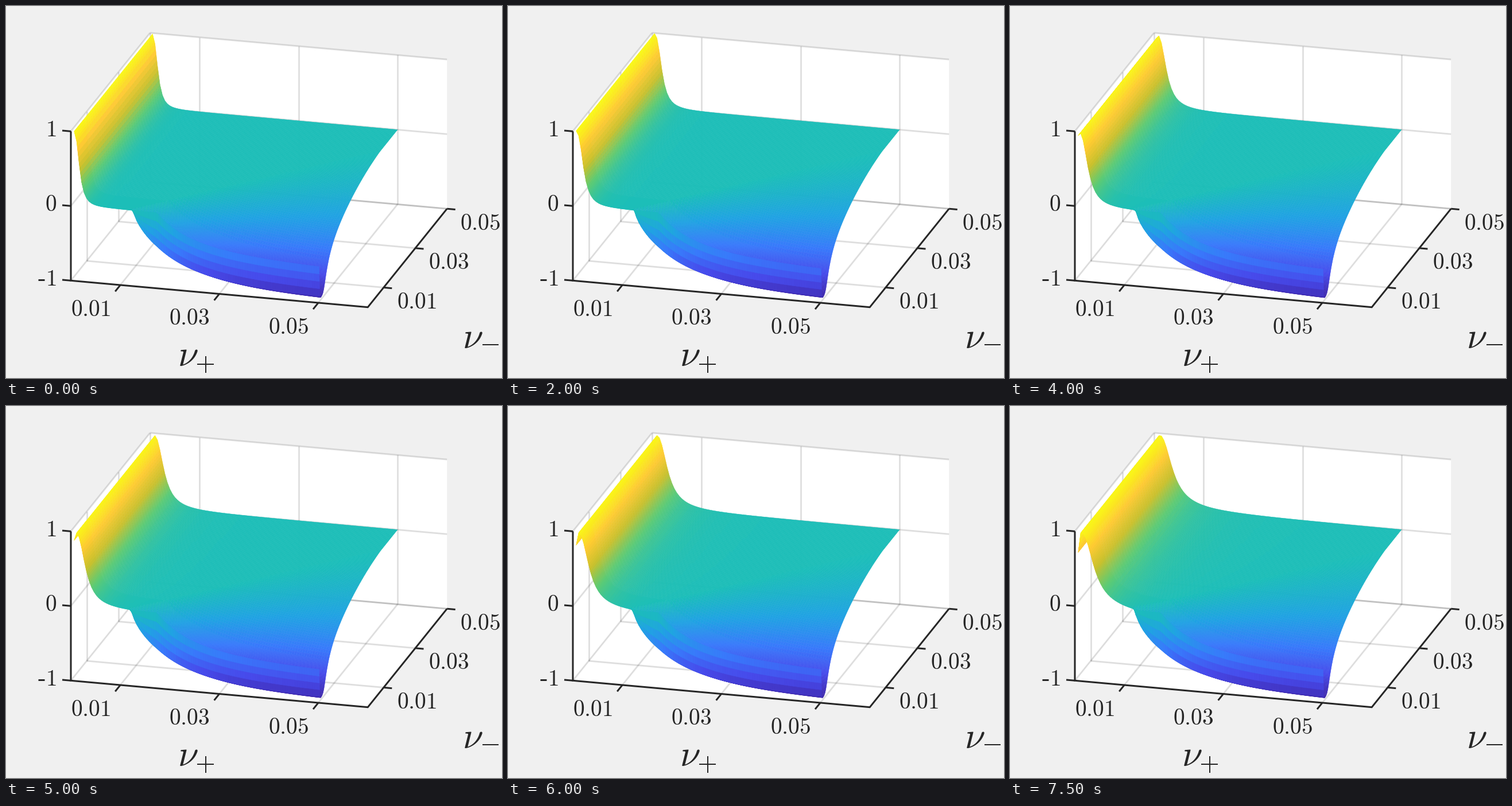
Recreate the animation shown at these times as a matplotlib script. Size 864 by 648 pixels, loop 8 s.

```python
import numpy as np
import matplotlib.pyplot as plt
from matplotlib.animation import FuncAnimation
from matplotlib.collections import PolyCollection
from matplotlib.colors import LinearSegmentedColormap

W, H = 864, 648
FRAMES, STEP = 16, 500
INK = "#262626"
X1, Y1 = .06, .05
TICKS = (.01, .03, .05)
ZT = (-1, 0, 1)
plt.rcParams["mathtext.fontset"] = "cm"

# evenly spaced key colours from indigo through teal to yellow
KEYS = ("#3e26a8 #474aeb #387afb #20a3e3 #1bbeb9 "
        "#5dcb75 #cac12d #feca33 #f9fb15").split()
cmap = LinearSegmentedColormap.from_list("surface", KEYS, N=256)


def project(x, y, z):
    """Orthographic view of the box, in stage pixels."""
    return (113 + 8620 * x + 2760 * y,
            348.3 + 773 * x - 3430 * y - 130 * z)


def height(x, y, t):
    """Surface value at rates x, y after t seconds."""
    # upper lobe along small x: widens, and its rim sinks after 3 s
    a = .00145 * np.exp(.097 * t)
    up = (1 + (x / a) ** 4) ** (-.75 + .033 * t)
    up = up * np.clip(1 - (x / (.0124 + .9 * y)) ** 3, 0, 1)
    up = up - .065 * max(t - 3, 0) * np.exp(-(x - .0005) / .0002)

    # lower lobe, starting at a slanted threshold
    c = .01125 - .00008 * t + y
    r = np.clip(x / c - 1, 0, None)
    down = np.tanh(1.04 * r ** (.65 + 10 * y))
    down = down * (1 + (y / .0036) ** 8) ** -.09

    # the lobe weakens at the front rim
    amp = .585 + .045 * (1 - np.exp(-t / 2.2))
    rim = amp * np.clip(1 - (.0172 / x) ** 2.2, 0, None)
    w = np.exp(-(y - .0005) / .0002)
    return up - (1 - w) * down - w * rim


fig = plt.figure(figsize=(W / 72, H / 72), dpi=72, facecolor="#f0f0f0")
ax = fig.add_axes([0, 0, 1, 1])
ax.set_xlim(0, W)
ax.set_ylim(H, 0)
ax.axis("off")


def line(p, q, color=INK, lw=3, zorder=5, **kw):
    ax.plot([p[0], q[0]], [p[1], q[1]], color=color, lw=lw, zorder=zorder,
            solid_capstyle="butt", **kw)


def grid(p, q):
    line(project(*p), project(*q), alpha=.15, lw=2.8, zorder=2)


def wall(*corners):
    ax.fill(*zip(*[project(*p) for p in corners]), color="white", lw=0, zorder=1)


def label(x, y, s, size=39.5):
    ax.text(x, y, f"${s}$", fontsize=size, color=INK,
            ha="center", va="baseline", zorder=6)


# box
wall((0, Y1, -1), (X1, Y1, -1), (X1, Y1, 1), (0, Y1, 1))
wall((0, 0, -1), (0, Y1, -1), (0, Y1, 1), (0, 0, 1))
wall((0, 0, -1), (X1, 0, -1), (X1, Y1, -1), (0, Y1, -1))
for v in TICKS:
    grid((v, Y1, -1), (v, Y1, 1))
    grid((v, 0, -1), (v, Y1, -1))
    grid((0, v, -1), (0, v, 1))
    grid((0, v, -1), (X1, v, -1))
for z in ZT:
    grid((0, Y1, z), (X1, Y1, z))
    grid((0, 0, z), (0, Y1, z))

# axes, ticks and tick labels
frame = [project(*p) for p in
         [(0, 0, 1), (0, 0, -1), (X1, 0, -1), (X1, Y1, -1)]]
ax.plot(*zip(*frame), color=INK, lw=3, solid_joinstyle="miter",
        solid_capstyle="butt", zorder=5)
for v in TICKS:
    px, py = project(v, 0, -1)
    line((px, py), (px - 9, py + 11.2))
    label(px - 52, py + 54, f"{v:.2f}")
    px, py = project(X1, v, -1)
    line((px, py), (px + 14.5, py + 1.3))
    label(px + 58, py + 36.5, f"{v:.2f}")
for z in ZT:
    px, py = project(0, 0, z)
    line((px, py), (px - 15, py - 1.3))
    label(px - 35, py + 8.3, abs(z))
line((56, 476.5), (66.5, 476.5))

# axis names
label(317, 627, r"\nu", 64)
line((333, 624), (362, 624), lw=2)
line((347.5, 609.5), (347.5, 638.5), lw=2)
label(812.5, 596, r"\nu", 64)
line((830, 590), (858, 590), lw=2)

# coarse samples, split linearly where the surface is steep
g = np.linspace(.0005, .05, 100)
fine = np.concatenate([np.linspace(g[0], g[12], 48, endpoint=False), g[12:]])
M = np.array([np.interp(fine, g, e) for e in np.eye(len(g))]).T
GX, GY = np.meshgrid(g, g)
X, Y = np.meshgrid(fine, fine[::-1])
surf = PolyCollection([], cmap=cmap, edgecolors="face", linewidths=.5, zorder=4)
surf.set_clim(-1, 1)
ax.add_collection(surf, autolim=False)


def cells(a):
    """Four corners of every cell, from back to front."""
    return np.stack([a[:-1, :-1], a[:-1, 1:], a[1:, 1:], a[1:, :-1]], axis=2)


def draw(i):
    Z = (M @ height(GX, GY, i * STEP / 1000) @ M.T)[::-1]
    P = np.stack(project(X, Y, Z), axis=-1)
    surf.set_verts(cells(P).reshape(-1, 4, 2))
    surf.set_array(cells(Z).mean(axis=2).ravel())
    return surf,


anim = FuncAnimation(fig, draw, frames=FRAMES, interval=STEP,
                     repeat=True, repeat_delay=0)
plt.show()
```
